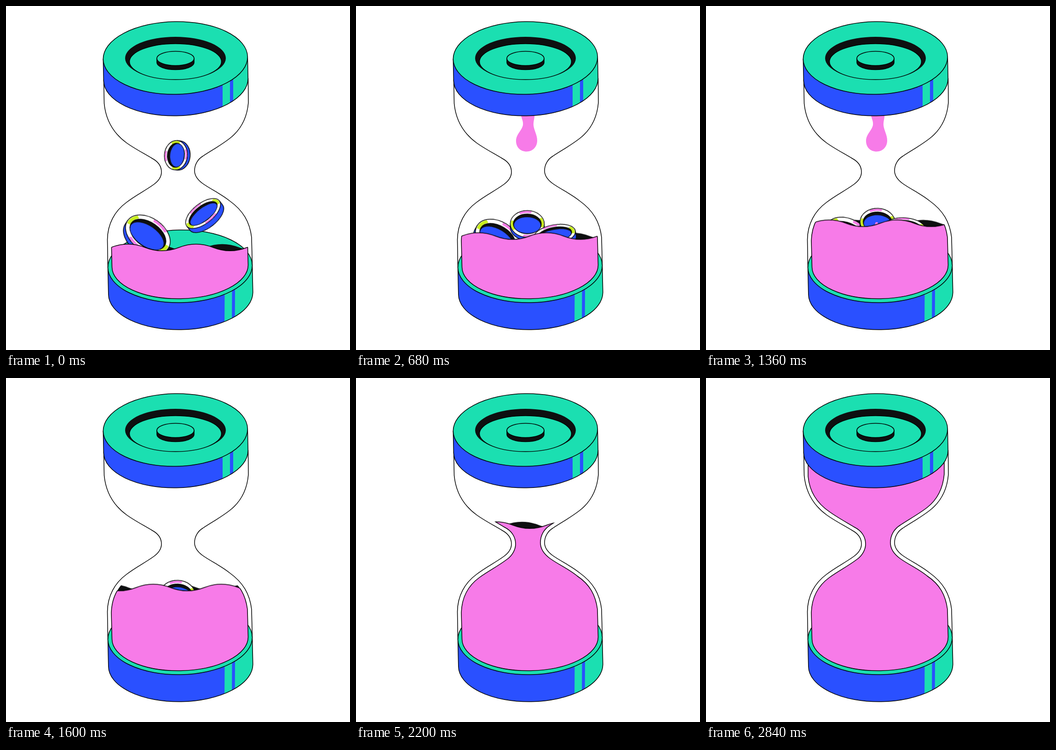
These frames come from a looping animation (748 by 748 pixels, 3000 ms). An HTML page without scripts:

```html
<!DOCTYPE html>
<html lang="en">
<head>
<meta charset="utf-8">
<title>Hourglass</title>
<style>
html, body { margin: 0; height: 100%; overflow: hidden; background: #fff; }
svg { display: block; width: 100%; height: 100%; }
:root { --green: #1bdfb1; --blue: #2a50ff; --pink: #f77be8; --ink: #0e0f10; --lime: #c9ef1c; }

.ln { stroke: #000; stroke-width: 1.5; stroke-linejoin: round; vector-effect: non-scaling-stroke; }
.green { fill: var(--green); }
.blue { fill: var(--blue); }
.pink { fill: var(--pink); }
.ink { fill: var(--ink); }
.white { fill: #fff; }
.none { fill: none; }
.chip { fill: none; stroke-width: 7; stroke-dasharray: 1 3; transform: rotate(var(--spin)); }

/* liquid surface: level and sideways drift run separately */
.wave {
  d: path("M-660 0q37 -14.6 74 0t74 0t74 0t74 0t74 0t74 0t74 0t74 0t74 0t74 0t74 0t74 0t74 0t74 0t74 0t74 0t74 0t74 0V700H-660Z");
  animation: rise 3s linear infinite, drift 3s linear infinite;
}
@keyframes drift { from { transform: translateX(0); } to { transform: translateX(658px); } }
@keyframes rise {
  0% { translate: 0 525px; }
  12% { translate: 0 517px; }
  18.67% { translate: 0 507px; }
  33.33% { translate: 0 482.5px; }
  37.33% { translate: 0 478.5px; }
  45.33% { translate: 0 472.5px; }
  56% { translate: 0 450px; }
  62.67% { translate: 0 409px; }
  74.67% { translate: 0 309px; }
  82.67% { translate: 0 245px; }
  93.33% { translate: 0 178px; }
  94.67%, 100% { translate: 0 150px; }
}

.coin { animation: 3s linear infinite; }
.left { animation-name: left; --spin: 14deg; }
.mid { animation-name: mid; --spin: -8deg; }
.right { animation-name: right; --spin: -10deg; }
@keyframes left {
  0% { transform: translate(308.5px, 497px) rotate(35deg) scale(1.07, .725); }
  12% { transform: translate(307px, 506px) rotate(33deg) scale(1.04, .72); }
  33.33% { transform: translate(309px, 503px) rotate(30deg) scale(1.04, .72); }
  45.33%, 100% { transform: translate(310px, 500px) rotate(30deg) scale(1.06, .72); }
}
@keyframes mid {
  0% { transform: translate(369.5px, 324px) rotate(-85deg) scale(.64, .5); }
  8% { transform: translate(371px, 437px) rotate(-25deg) scale(.69, .55); }
  12% { transform: translate(372px, 464.5px) rotate(0deg) scale(.72, .56); }
  33.33% { transform: translate(373px, 483px) rotate(2deg) scale(.76, .6); }
  45.33%, 100% { transform: translate(373px, 470px) rotate(2deg) scale(.76, .6); }
}
@keyframes right {
  0% { transform: translate(428.5px, 451px) rotate(-38deg) scale(.9, .44); }
  12% { transform: translate(431.5px, 500.5px) rotate(-10deg) scale(.92, .42); }
  33.33% { transform: translate(432px, 494px) rotate(-11deg) scale(.92, .44); }
  45.33%, 100% { transform: translate(432px, 483px) rotate(4deg) scale(.9, .45); }
}

.drop {
  d: path("M350 225C352 227 354 229 356 230C358 232 360 233 362 234C364 236 366 236 369 236C372 236 374 236 376 234C378 233 380 232 382 230C384 229 386 227 388 225Z");
  fill: var(--pink);
  filter: blur(.6px);
  animation: drip 3s linear infinite;
}
.late { animation-delay: .68s; }
@keyframes drip {
  0%, 10% { d: path("M350 225C352 227 354 229 356 230C358 232 360 233 362 234C364 236 366 236 369 236C372 236 374 236 376 234C378 233 380 232 382 230C384 229 386 227 388 225Z"); }
  12% { d: path("M347 232C348 234 348 236 349 238C350 240 352 242 355 244C358 246 363 247 368 247C374 247 378 246 382 244C385 242 387 240 388 238C389 236 390 234 391 232Z"); }
  22.67% { d: path("M358 234C360 246 364 250 363 258C361 270 348 278 348 293C348 307 358 316 371 316C384 316 394 306 394 292C394 279 387 270 386 258C386 250 388 246 389 234Z"); }
  25.33% { d: path("M369 262C369 275 368 285 367 294C363 308 348 317 348 332C348 346 358 355 371 355C384 355 394 345 394 332C394 317 379 308 375 294C374 285 373 275 373 262Z"); }
  30%, 100% { d: path("M369 470C367 476 365 480 362 484C356 491 348 500 348 508C348 522 358 531 371 531C384 531 394 522 394 508C394 500 386 491 380 484C377 480 375 476 373 470Z"); }
}
</style>
</head>
<body>
<svg viewBox="0 0 748 748">
  <defs>
    <path id="inner" d="M222 160V214C225 246 241 272 268 290.5C286 303.5 305 313.5 323 324.5C338 332 347 345 347 361C347 373 340 386 328 394.5C309 409 287 420 268 434C242 453 230 479 229 510L230.5 568A148 71 -1 0 0 526.5 563L525 503C521 473 509 449 481 430.5C463 415.5 440 405.5 422 392.5C409 383 401 371 401 358C401 342 409 328 423 319.5C441 307.5 463 295.5 481 281.5C502 265 515 243 518 209V160Z"/>
    <path id="capSide" d="M211.3 115.5L212.3 162.5A157 79 -1 0 0 526.3 157L525.3 110Z"/>
    <path id="baseSide" d="M221.5 568.5L222.8 627.5A157 79 -1 0 0 536.8 622L535.5 563Z"/>
    <clipPath id="inside"><use href="#inner"/></clipPath>
    <clipPath id="inCap"><use href="#capSide"/></clipPath>
    <clipPath id="inBase"><use href="#baseSide"/></clipPath>
    <clipPath id="below"><path class="wave"/></clipPath>
    <g id="face">
      <circle r="50" class="white ln"/>
      <circle r="45" class="chip" pathLength="8" stroke="var(--lime)" stroke-dashoffset=".5"/>
      <circle r="45" class="chip" pathLength="8" stroke="var(--pink)" stroke-dashoffset="-1.5"/>
      <ellipse rx="41" ry="37" class="ink ln"/>
      <ellipse cy="5" rx="39" ry="30" class="blue"/>
    </g>
  </defs>

  <!-- base -->
  <g clip-path="url(#inBase)">
    <use href="#baseSide" class="green"/>
    <path class="blue" d="M210 540H476L475 710H210ZM492 540H498.5L497.5 710H491Z"/>
  </g>
  <use href="#baseSide" class="none ln"/>
  <ellipse cx="378.5" cy="566" rx="157" ry="79" transform="rotate(-1 378.5 566)" class="green ln"/>

  <!-- far side of the surface -->
  <g clip-path="url(#inside)">
    <g transform="translate(57 0)"><path class="wave ink"/></g>
  </g>

  <g class="coin left">
    <path class="blue ln" d="M-50 0V11A50 50 0 0 0 50 11V0Z"/>
    <use href="#face"/>
  </g>
  <g class="coin mid">
    <path class="blue ln" d="M-50 0V12A50 50 0 0 0 50 12V0Z"/>
    <use href="#face"/>
  </g>
  <g class="coin right">
    <path class="blue ln" d="M-50 0V26A50 50 0 0 0 50 26V0Z"/>
    <use href="#face"/>
  </g>

  <path class="drop"/>
  <path class="drop late"/>

  <!-- liquid -->
  <g clip-path="url(#below)"><use href="#inner" class="pink ln"/></g>
  <g clip-path="url(#inside)"><path class="wave none ln"/></g>

  <!-- glass -->
  <path class="none ln" d="M212.5 160L213.5 212C217 248 234 277 262 297.5C280 310.5 300 320.5 318 331.5C331 338.5 338 349 338 361C338 371 332 380 322 387.5C303 401.5 281 412 262 427C236 446 221 474 220.5 508L221.5 568"/>
  <path class="none ln" d="M526.5 157L527 210C524 246 508 271 487 287.5C468 302.5 446 314.5 428 326.5C417 333 410 345 410 358C410 369 417 378 427 385.5C445 398.5 468 408.5 486 423.5C516 445 530 470 534 503L535.5 563"/>

  <!-- cap -->
  <g clip-path="url(#inCap)">
    <use href="#capSide" class="green"/>
    <path class="blue" d="M200 100H471V250H200ZM487 100H494V250H487Z"/>
  </g>
  <use href="#capSide" class="none ln"/>
  <ellipse cx="368.3" cy="113" rx="157" ry="79" transform="rotate(-1 368.3 113)" class="green ln"/>
  <ellipse cx="368.5" cy="113.5" rx="109.5" ry="46.5" class="ink"/>
  <ellipse cx="368.5" cy="121" rx="100" ry="39" class="green ln"/>
  <path class="ink ln" d="M328 114V123A40.5 15.5 0 0 0 409 123V114Z"/>
  <ellipse cx="368.5" cy="114" rx="40.5" ry="15.5" class="green ln"/>
</svg>
</body>
</html>
```
